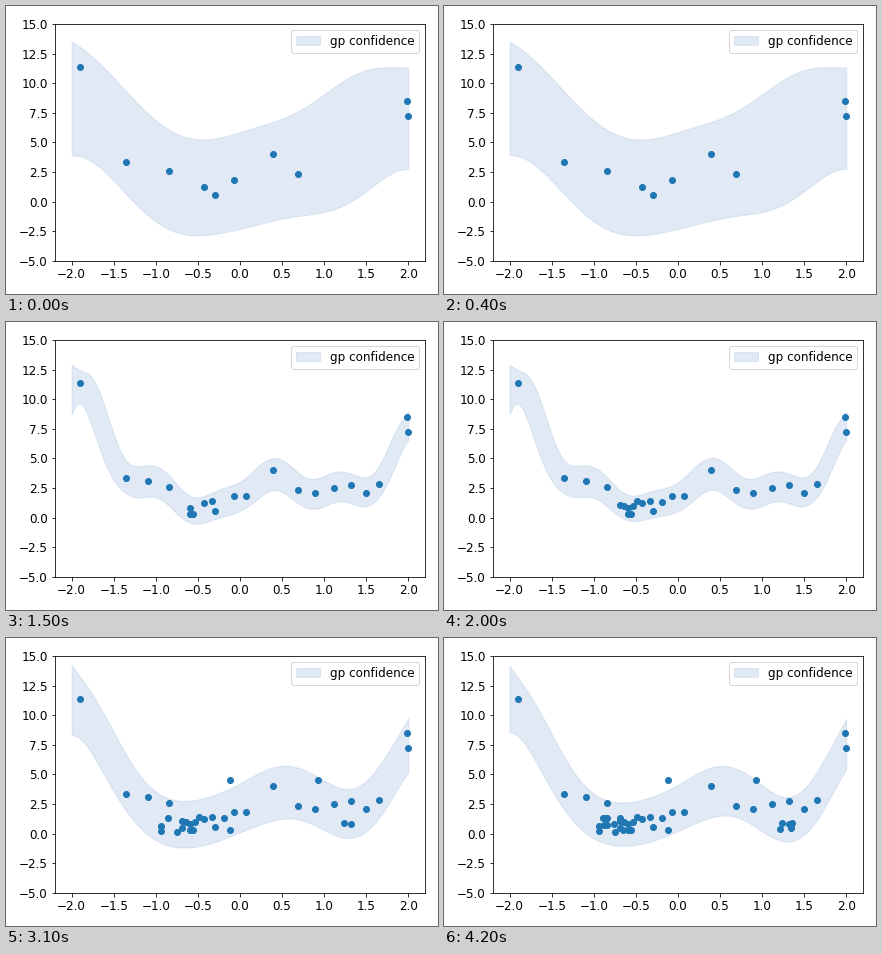
These frames come from a looping animation (432x288 px, 4300 ms). A matplotlib script:

```python
import numpy as np
import matplotlib.pyplot as plt
from matplotlib.animation import FuncAnimation

plt.rcParams.update({"font.family": "DejaVu Sans", "font.size": 12})

FRAMES, INTERVAL = 43, 100
START_COUNT = 6
OPENING_STEP = 4
GRID = np.linspace(-2, 2, 161)

# Exploring samples, in the order in which they arrive
EXPLORED = [
    (-1.9, 11.35), (-1.35, 3.35), (-0.84, 2.6), (0.39, 4.0), (0.69, 2.35), (1.99, 8.5),
    (-0.07, 1.8), (2.0, 7.2), (-0.43, 1.22), (-0.3, 0.55), (1.5, 2.1), (-1.09, 3.1),
    (1.12, 2.5), (0.89, 2.1), (-0.59, 0.8), (1.65, 2.85), (-0.33, 1.4), (0.07, 1.8),
    (-0.59, 0.3), (1.32, 2.75), (-0.56, 0.3), (-0.69, 1.05), (-0.19, 1.3), (-0.53, 1.0),
    (-0.49, 1.45), (-0.64, 1.0), (-0.12, 4.5), (-0.69, 0.5), (0.93, 4.5), (-0.12, 0.3),
]

# Step, signal scale, length scale and noise; the fit jumps at the first outlier
FITS = np.array([
    (1, 3.1, 1.1, 3.5),
    (2, 3.3, 1.0, 2.93),
    (4, 3.8, 0.8, 1.78),
    (7, 3.0, 0.35, 0.66),
    (15, 3.1, 0.35, 0.5),
    (20, 3.1, 0.35, 0.5),
    (21, 5.0, 0.65, 1.0),
    (42, 5.0, 0.65, 0.89),
])


def late_samples(count):
    """Samples that gather in the valleys of the curve."""
    rng = np.random.default_rng(4)
    x = np.resize([-0.9, 1.33, -0.75], count) + rng.normal(0, 0.06, count)
    y = rng.uniform(0, 1.4, count)
    return np.column_stack([x, y])


total = START_COUNT + FRAMES - 1
POINTS = np.vstack([EXPLORED, late_samples(total - len(EXPLORED))])


def kernel(a, b, scale, length):
    return scale ** 2 * np.exp(-0.5 * ((a[:, None] - b) / length) ** 2)


def confidence(points, scale, length, noise):
    """Two-sigma band of a Gaussian process with noisy samples."""
    x, y = points.T
    cross = kernel(GRID, x, scale, length)
    cov = kernel(x, x, scale, length) + noise ** 2 * np.eye(len(x))
    weights = np.linalg.solve(cov, cross.T)
    variance = scale ** 2 + noise ** 2 - np.sum(cross.T * weights, axis=0)
    mean, half = y @ weights, 2 * np.sqrt(variance)
    return mean + half, mean - half


def fit_at(step):
    return [np.interp(step, FITS[:, 0], column) for column in FITS[:, 1:].T]


fig, ax = plt.subplots(figsize=(6, 4), dpi=72)
ax.set_xlim(-2.2, 2.2)
ax.set_ylim(-5, 15)
ax.set_xticks(np.arange(-2, 2.1, 0.5))
ax.set_yticks(np.arange(-5, 15.1, 2.5))

area = ax.fill_between(GRID, 0, 1, color="#afc5e4", alpha=0.37,
                       linewidth=1, label="gp confidence")
dots, = ax.plot([], [], "o", color="#1f77b4", markersize=6)
ax.legend(loc="upper right")
fig.tight_layout()


def update(frame):
    # The loop opens on a later view before it starts to count up
    step = frame or OPENING_STEP
    points = POINTS[:START_COUNT + step]
    upper, lower = confidence(points, *fit_at(step))
    outline = np.column_stack([np.append(GRID, GRID[::-1]),
                               np.append(upper, lower[::-1])])
    area.set_verts([outline])
    dots.set_data(*points.T)
    return area, dots


anim = FuncAnimation(fig, update, frames=FRAMES, interval=INTERVAL,
                     repeat=True, repeat_delay=0, blit=False)
plt.show()
```
